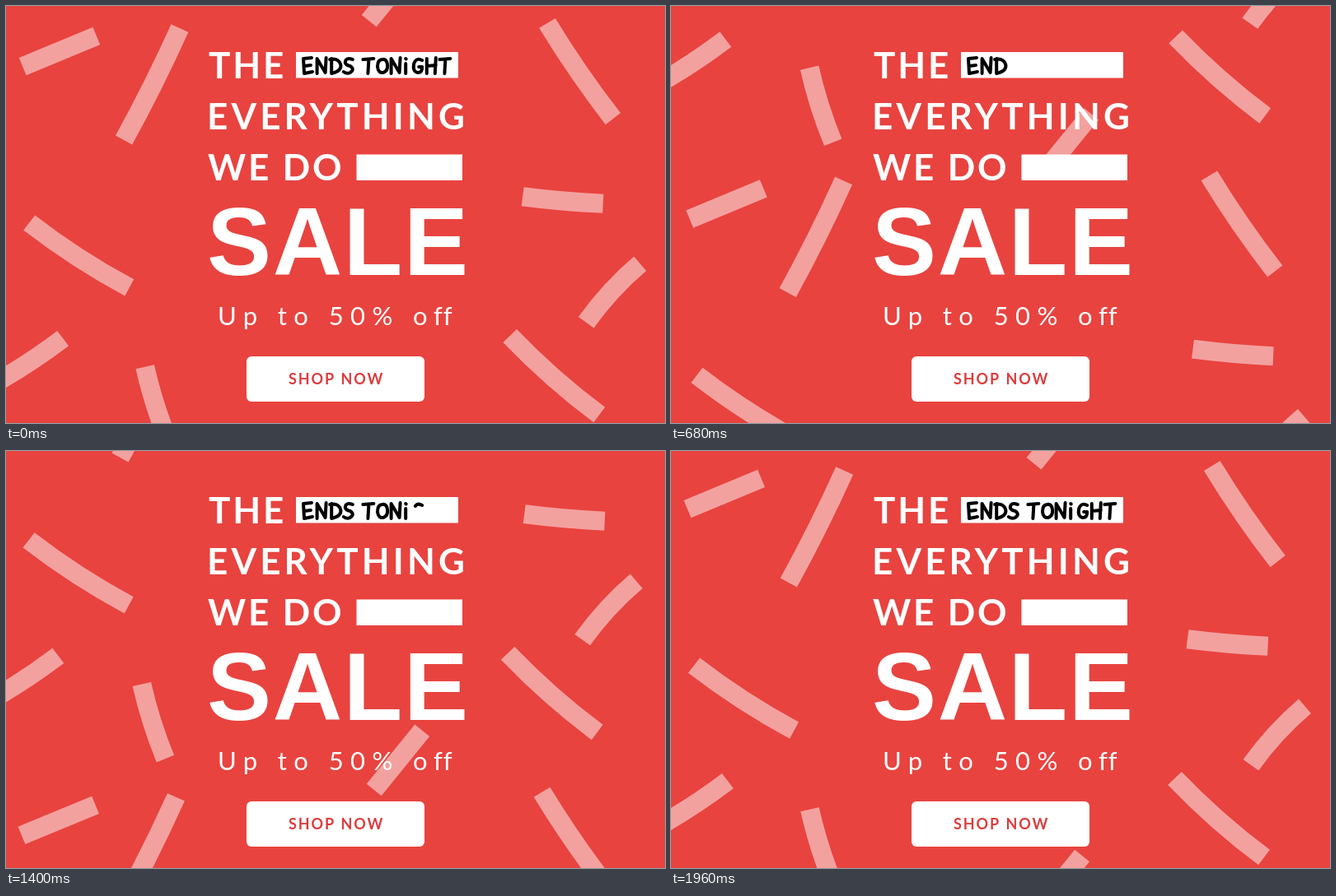
These frames come from a looping animation (800x507 px, 2000 ms). An HTML page with a canvas:

```html
<!DOCTYPE html>
<html lang="en">
<head>
<meta charset="utf-8">
<title>Sale banner</title>
<style>
html, body { margin: 0; width: 100%; height: 100%; overflow: hidden; background: #e8433f; }
canvas { display: block; }
</style>
</head>
<body>
<canvas id="stage" width="800" height="507" role="img"
  aria-label="The everything we do sale, ends tonight. Up to 50% off. Shop now."></canvas>
<script>
const ctx = document.getElementById('stage').getContext('2d');
const LOOP = 2000, STEP = 40, W = 800, H = 507;
const SPAN = 549;        // height of the repeating confetti sheet
const SPEED = 0.2783;    // fall in px per ms
const RED = '#e8433f', WHITE = '#fff';
const LIGHT = 'Lato, "Open Sans", sans-serif';
const HEAVY = '"Liberation Sans", Arial, sans-serif';

const strip = (x, y, len, angle, bend, sway) => ({ x, y, len, angle, bend, sway });

// Centre, length, angle in degrees, bow of the midline, sideways drift at mid-loop
const strips = [
  strip(65, 55, 97, -22.5, 0, 1),
  strip(177, 95, 152, 116.5, -1.5, -4),
  strip(697, 79, 141, 55.5, 2, -7),
  strip(676, 236, 98, 5, 1, 6),
  strip(89, 303, 145, 33, 3, 2),
  strip(23, 434, 110, -33, 2, -6),
  strip(183, 484, 95, 72.5, 2, -3),
  strip(666, 449, 145, 41.5, 3, -1),
  strip(737, 349, 97, 132.5, 3, -4),
  strip(470, -18, 93, 129, 0, 12)
];

function drawStrip(s, phase, shift) {
  const a = s.angle * Math.PI / 180;
  const c = Math.cos(a), n = Math.sin(a), half = s.len / 2;
  const x = s.x + s.sway * Math.sin(phase / 2) ** 2 + 2 * Math.sin(phase);
  const y = s.y + shift - 4.5 * Math.sin(phase);
  ctx.beginPath();
  ctx.moveTo(x - c * half, y - n * half);
  ctx.quadraticCurveTo(x - n * s.bend * 2, y + c * s.bend * 2, x + c * half, y + n * half);
  ctx.stroke();
}

function drawConfetti(t) {
  const phase = 2 * Math.PI * t / LOOP;
  ctx.strokeStyle = 'rgba(255,255,255,0.5)';
  ctx.lineWidth = 23;
  ctx.lineCap = 'butt';
  for (const s of strips) {
    drawStrip(s, phase, t * SPEED);
    drawStrip(s, phase, t * SPEED - SPAN);
  }
}

// Tracks a line out between two edges of the column
function line(text, left, right, base, font, color = WHITE) {
  ctx.font = font;
  ctx.fillStyle = color;
  ctx.letterSpacing = '0px';
  const m = ctx.measureText(text);
  const ink = m.actualBoundingBoxLeft + m.actualBoundingBoxRight;
  ctx.letterSpacing = (right - left - ink) / (text.length - 1) + 'px';
  ctx.fillText(text, left + m.actualBoundingBoxLeft, base);
}

function drawHeadline() {
  const head = `700 44px ${LIGHT}`, offer = `400 31px ${LIGHT}`;
  line('THE', 246, 336, 87.5, head);
  line('EVERYTHING', 247, 555, 150, head);
  line('WE DO', 245, 406, 211.5, head);
  line('SALE', 247, 557, 327, `700 117px ${HEAVY}`);
  line('Up to 50% o', 259, 511, 388, offer);
  line('ff', 519, 541, 388, offer);

  ctx.fillRect(352, 56, 197, 31.5);
  ctx.fillRect(425.5, 180.5, 128.5, 31.5);
  ctx.beginPath();
  ctx.roundRect(292, 426, 216, 55, 6);
  ctx.fill();
  line('SHOP NOW', 343, 457.5, 460, `700 18px ${LIGHT}`, '#dc3c3d');
}

// Brush lettering, each glyph drawn as pen strokes
const PEN = {
  E: 'M1 1L2 19M1 1L11 0M2 10L10 9M2 19L12 17',
  N: 'M1 19L1 1L11 18L12 0',
  D: 'M2 1L2 19Q15 16 13 8Q10 0 0 2',
  S: 'M11 2Q2 -1 2 6Q3 9 8 10Q14 14 8 18Q4 20 0 17',
  T: 'M0 2L13 1M7 2L6 19',
  O: 'M7 2Q1 2 1 11Q2 19 8 18Q14 16 13 8Q12 1 7 2Z',
  I: 'M2 7L2 19M2 1L2.5 1.5',
  G: 'M12 3Q5 -1 2 7Q0 17 7 18Q12 18 12 11L8 11',
  H: 'M1 1L1 19M12 0L11 19M1 10L12 9'
};
const ADVANCE = { ' ': 7, I: 10 };
const note = [];
let penX = 360;
for (const ch of 'ENDS TONIGHT') {
  if (PEN[ch]) note.push({ x: penX, path: new Path2D(PEN[ch]) });
  penX += ADVANCE[ch] || 16.6;
}

// The finished note shows for one step, then it is written again
function drawNote(t) {
  const done = t < STEP ? Infinity : (t - 265) * 0.0072;
  ctx.strokeStyle = '#000';
  ctx.lineWidth = 4;
  ctx.lineCap = ctx.lineJoin = 'round';
  note.forEach(({ x, path }, i) => {
    const p = Math.min(1, (done - i) / 1.1);
    if (p <= 0) return;
    ctx.save();
    ctx.translate(x, 63);
    if (p < 1) ctx.setLineDash([60 * p, 200]);
    ctx.stroke(path);
    ctx.restore();
  });
}

function draw(now) {
  const t = Math.floor((now % LOOP) / STEP) * STEP;
  ctx.fillStyle = RED;
  ctx.fillRect(0, 0, W, H);
  drawConfetti(t);
  drawHeadline();
  drawNote(t);
}

const start = performance.now();
function tick(now) {
  draw(Math.max(0, now - start));
  requestAnimationFrame(tick);
}
draw(0);
requestAnimationFrame(tick);
</script>
</body>
</html>
```
